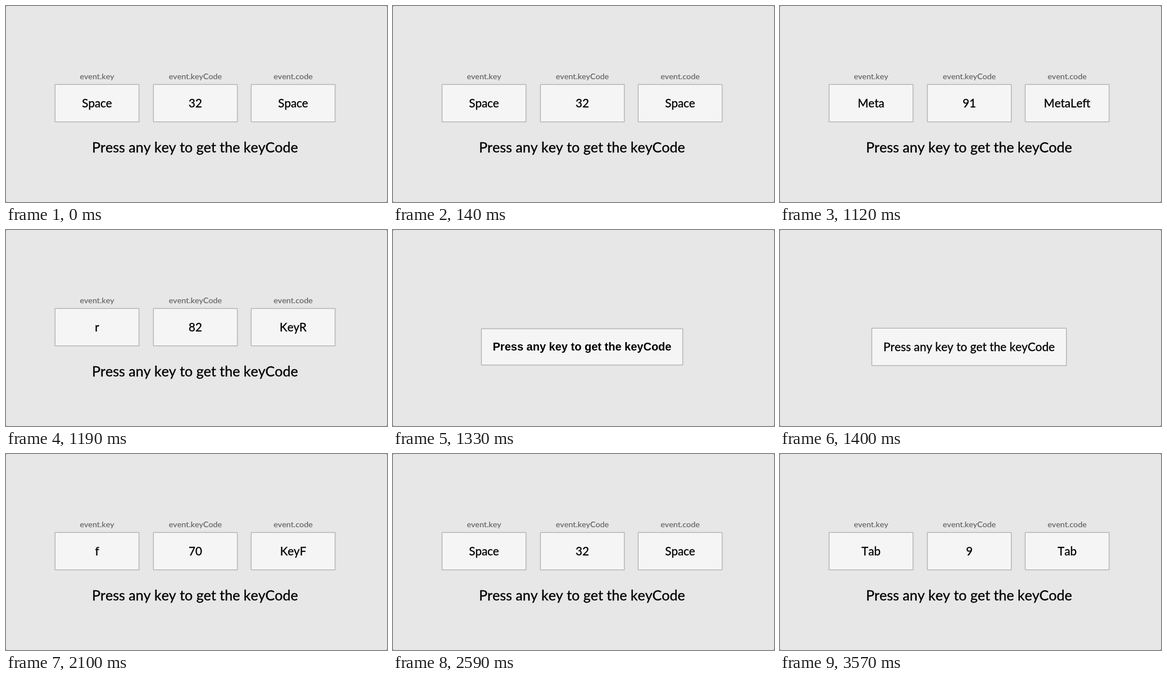
Recreate the animation shown at these times as an HTML page. Size 678x348 px, loop 4.27 s.

```html
<!DOCTYPE html>
<html lang="en">
<head>
<meta charset="utf-8">
<title>Key codes</title>
<style>
  html, body { margin: 0; width: 100%; height: 100%; overflow: hidden; background: #555; }
  svg { display: block; width: 678px; height: 348px; background: #e7e7e7; border-radius: 2px; }
  rect { fill: #f5f5f5; stroke: #aaa; filter: drop-shadow(0 0 1.5px rgba(0, 0, 0, .1)); }
  text { font-family: Lato, Inter, sans-serif; font-kerning: none; text-anchor: middle; }
  .label { font-size: 14.3px; fill: #606060; stroke: #606060; stroke-width: .15px; }
  .value, .title { stroke: #000; stroke-width: .35px; }
  .value { font-size: 20.5px; }
  .title { font-size: 25px; }
  .prompt { font-size: 20.8px; }
  .fallback { font: bold 20px "Liberation Sans", Arial, sans-serif; }
  [hidden] { display: none; }
</style>
</head>
<body>
<svg viewBox="0 0 678 348">
  <g id="keys">
    <g id="cards"></g>
    <text class="title" x="336.3" y="260">Press any key to get the keyCode</text>
  </g>
  <g id="plain">
    <rect x="157.5" y="175.5" width="358" height="64"/>
    <text class="fallback" x="336.5" y="214">Press any key to get the keyCode</text>
  </g>
  <g id="styled">
    <rect x="163.5" y="174.5" width="346" height="66"/>
    <text class="value prompt" x="336.5" y="215.4">Press any key to get the keyCode</text>
  </g>
</svg>
<script>
  const LOOP = 4270;

  // start time, visible view, values of the three cards
  const steps = [
    [0, "keys", ["Space", "32", "Space"]],
    [1120, "keys", ["Meta", "91", "MetaLeft"]],
    [1190, "keys", ["r", "82", "KeyR"]],
    [1330, "plain"],
    [1400, "styled"],
    [2100, "keys", ["f", "70", "KeyF"]],
    [2590, "keys", ["Space", "32", "Space"]],
    [3570, "keys", ["Tab", "9", "Tab"]]
  ];

  const byId = id => document.getElementById(id);
  const cards = [[87.5, "event.key"], [262.5, "event.keyCode"], [436.5, "event.code"]];
  byId("cards").innerHTML = cards.map(([x, label]) => `
    <text class="label" x="${x + 74.5}" y="130.4">${label}</text>
    <rect x="${x}" y="139.5" width="149" height="66"/>
    <text class="value card" x="${x + 74.5}" y="180"></text>`).join("");

  const values = document.querySelectorAll(".card");
  const views = ["keys", "plain", "styled"].map(byId);
  let shown;

  function show(step) {
    if (step === shown) return;
    shown = step;
    const [, view, texts] = step;
    views.forEach(el => el.toggleAttribute("hidden", el.id !== view));
    if (texts) values.forEach((el, i) => { el.textContent = texts[i]; });
  }

  const start = performance.now();
  function draw() {
    const time = (performance.now() - start) % LOOP;
    show(steps.filter(([at]) => at <= time).pop());
    requestAnimationFrame(draw);
  }
  draw();
</script>
</body>
</html>
```
